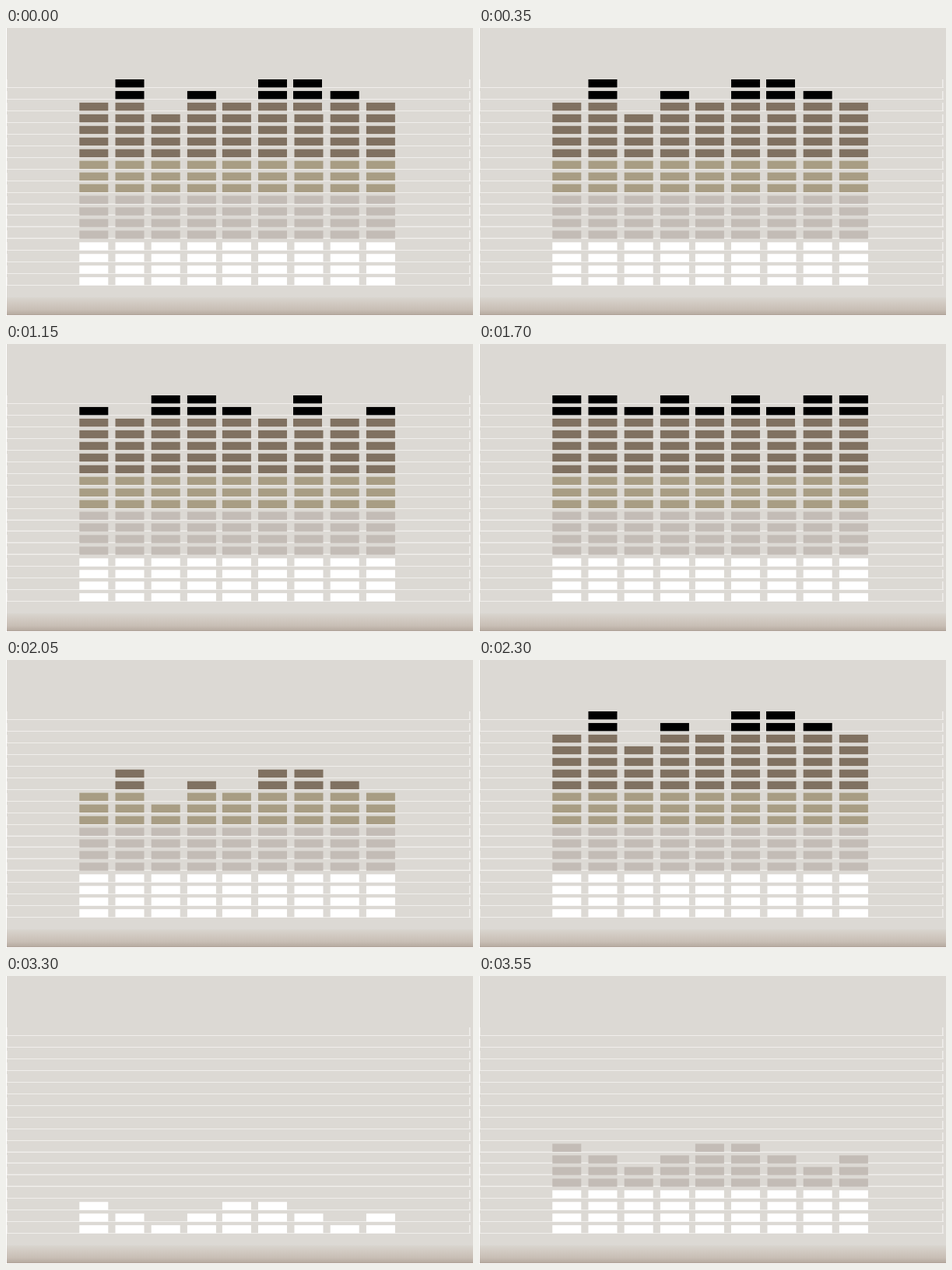
An HTML page with a canvas that plays this animation: 600 by 370 pixels, repeating every 4050 ms.

```html
<!DOCTYPE html>
<html lang="en">
<head>
<meta charset="utf-8">
<title>Equalizer</title>
<style>
  html, body { margin: 0; width: 100%; height: 100%; overflow: hidden; background: #fff; }
  canvas { display: block; }
</style>
</head>
<body>
<canvas id="stage" width="600" height="370"></canvas>
<script>
const ctx = document.getElementById('stage').getContext('2d');
const LOOP = 4050, ROWS = 18, TOP = 66, PITCH = 14.95, CELL_W = 37, CELL_H = 10.4;
const columns = [94.3, 140.5, 186.7, 232.9, 277.9, 324, 370.5, 416.7, 462.9];

// Topmost lit row of each column
const lower = tops => tops.map(t => t + 5);
const base = [2, 0, 3, 1, 2, 0, 0, 1, 2];
const sway = [1, 2, 0, 0, 1, 2, 0, 2, 1];
const peak = [0, 0, 1, 0, 1, 0, 1, 0, 0];
const mid = lower(base);
const low = [10, 11, 12, 11, 10, 10, 11, 12, 11];
const floor = lower(low);

const steps = [
  [0, base], [250, sway], [350, base], [600, peak], [700, base],
  [950, sway], [1050, peak], [1150, sway], [1250, base],
  [1500, peak], [1600, sway], [1700, peak], [1800, low],
  [2050, mid], [2300, base], [2550, mid], [2800, low],
  [3300, floor], [3550, low]
];

function rowColor(row) {
  if (row < 2) return '#000';
  if (row < 7) return '#807161';
  if (row < 10) return '#a89d84';
  if (row < 14) return '#c3bcb6';
  return '#fff';
}

function rect(color, x, y, w, h) {
  ctx.fillStyle = color;
  ctx.fillRect(x, y, w, h);
}

function drawBackground() {
  rect('#fff', 0, 0, 600, 370);
  rect('#dcd9d4', 1, 0, 599, 369);
  const shade = ctx.createLinearGradient(0, 346, 0, 369);
  shade.addColorStop(0, '#d9d5cf');
  shade.addColorStop(0.3, '#d2cbc3');
  shade.addColorStop(0.7, '#c8beb5');
  shade.addColorStop(1, '#b3a79d');
  rect(shade, 1, 346, 599, 23);

  for (let row = 0; row < ROWS; row++) {
    const y = Math.round(TOP + row * PITCH);
    const thick = row > 9 && row < 14;
    rect('#f0eeeb', 1, y + (thick ? 9.5 : 10), 596, thick ? 1.5 : 1);
    rect('#f0eeeb', 595, y, 1.5, 10);
    rect('#eae8e4', 1, y, 1, 10);
  }
}

function drawBars(tops) {
  tops.forEach((top, col) => {
    for (let row = top; row < ROWS; row++) {
      const nudge = col === 6 && row < 3 ? -1.5 : 0;
      rect(rowColor(row), columns[col] + nudge, TOP + row * PITCH, CELL_W, CELL_H);
    }
  });
}

const start = performance.now();
let shown = null;

function draw(now) {
  const t = Math.max(0, now - start) % LOOP;
  const tops = steps.findLast(([at]) => at <= t)[1];
  if (tops !== shown) {
    drawBackground();
    drawBars(tops);
    shown = tops;
  }
  requestAnimationFrame(draw);
}
draw(start);
</script>
</body>
</html>
```
